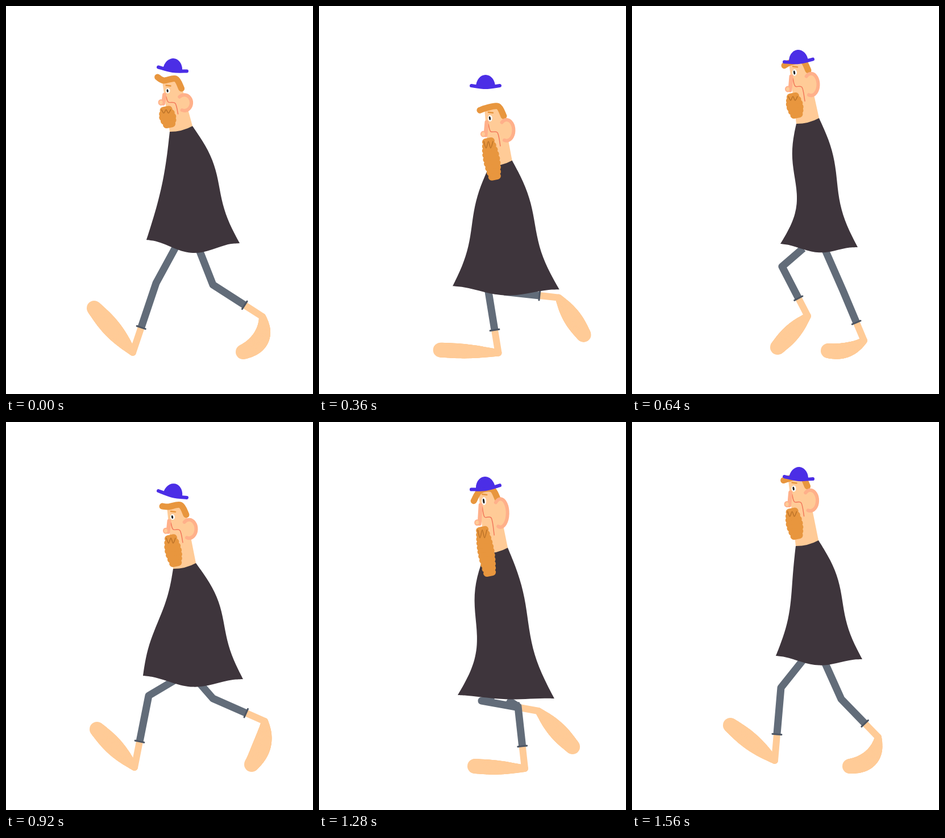
These frames come from a looping animation (540x682 px, 1.6 s). An HTML page with a canvas:

```html
<!DOCTYPE html>
<html lang="en">
<head>
<meta charset="utf-8">
<title>Walk</title>
<style>
  html, body { margin: 0; width: 100%; height: 100%; overflow: hidden; background: #fff; }
  canvas { display: block; }
</style>
</head>
<body>
<canvas id="stage" width="540" height="682"></canvas>
<script>
const ctx = document.getElementById('stage').getContext('2d');
const SKIN = '#ffcb97', PINK = '#ffb08a', LINE = '#f2775a', HAIR = '#e8963e', LIP = '#bd7429';
const DRESS = '#3e353c', PANTS = '#626c79', CUFF = '#4d5664', HAT = '#4b2ee6';
const { PI, sin, cos, min, max, abs, hypot, floor } = Math;

// One step lasts 800 ms; the key poses repeat at these times of every step.
const STEP = 800, FRAME = 40, BEATS = [0, 120, 200, 480, 640, 760];

// knee, heel, toe: one step on the ground, one in the air
const LEG = [
  [264,487, 223,609, 155,531],
  [251,481, 226,607, 160,540],
  [236,491, 251,610, 161,604],
  [350,500, 362,609, 274,605],
  [371,500, 408,588, 345,606],
  [368,487, 433,554, 383,605],
  [364,490, 451,546, 417,608],
  [364,486, 455,526, 432,602],
  [374,511, 451,523, 476,595],
  [286,490, 386,508, 446,571],
  [264,458, 309,545, 256,600],
  [262,467, 251,595, 173,533],
];
// neck x and y, heights of eye, hat, beard tip and hem, half width of the hem
const BODY = [
  [308,216, 149, 113, 214, 414, 82],
  [314,253, 167, 129, 254, 449, 88],
  [323,303, 228, 153, 297, 473, 95],
  [312,226, 139, 117, 271, 483, 85],
  [309,202, 117,  98, 197, 421, 68],
  [308,213, 117, 100, 206, 414, 76],
];

// Cubic interpolation of a looping track; tight tracks never pass their extremes.
function pose(track, t, tight) {
  const n = BEATS.length;
  const now = floor(t / STEP) * n + BEATS.filter(b => b <= t % STEP).length - 1;
  const key = j => track[(j + track.length) % track.length];
  const when = j => BEATS[(j + n) % n] + STEP * floor(j / n);
  const gap = j => when(j + 1) - when(j);
  const slope = (j, c) => (key(j + 1)[c] - key(j)[c]) / gap(j);
  const speed = (j, c) => {
    const a = slope(j - 1, c), b = slope(j, c);
    if (tight) return a * b > 0 ? 2 * a * b / (a + b) : 0;
    return (a * gap(j) + b * gap(j - 1)) / (gap(j - 1) + gap(j));
  };
  const h = gap(now), u = (t - when(now)) / h, v = 1 - u;
  return key(now).map((p, c) =>
    p * v * v * (1 + 2 * u) + key(now + 1)[c] * u * u * (3 - 2 * u) +
    h * u * v * (speed(now, c) * v - speed(now + 1, c) * u));
}

const mix = (p, q, u) => [p[0] + (q[0] - p[0]) * u, p[1] + (q[1] - p[1]) * u];
const steps = n => Array.from({ length: n + 1 }, (_, i) => i / n);

// Adds a smooth curve through the points to the current path.
function trace(points) {
  ctx.lineTo(...points[0]);
  for (let i = 0; i < points.length - 1; i++) {
    const p = points[i], q = points[i + 1];
    const before = points[i - 1] || p, after = points[i + 2] || q;
    ctx.bezierCurveTo(
      p[0] + (q[0] - before[0]) / 6, p[1] + (q[1] - before[1]) / 6,
      q[0] - (after[0] - p[0]) / 6, q[1] - (after[1] - p[1]) / 6, ...q);
  }
}

function stroke(points, color, width, cap = 'round', smooth = true) {
  ctx.beginPath();
  if (smooth) trace(points);
  else points.forEach(p => ctx.lineTo(...p));
  ctx.strokeStyle = color;
  ctx.lineWidth = width;
  ctx.lineCap = cap;
  ctx.stroke();
}

function fill(points, color) {
  ctx.beginPath();
  points.forEach(p => ctx.lineTo(...p));
  ctx.fillStyle = color;
  ctx.fill();
}

function oval(x, y, rx, ry, color, turn = 0, from = 0, to = 2 * PI) {
  ctx.beginPath();
  ctx.ellipse(x, y, rx, ry, turn, from, to);
  ctx.fillStyle = color;
  ctx.fill();
}

function outline(color, width) {
  ctx.strokeStyle = color;
  ctx.lineWidth = width;
  ctx.stroke();
}

// Everything on the body follows from one row of numbers and the phase of the step.
function bodyAt(t) {
  const [neckX, neckY, eyeY, hatY, beardY, hemY, hemHalf] = pose(BODY, t);
  const stretch = (hemY - eyeY - 245) / 100;
  const swing = degrees => cos(2 * PI * t / STEP - degrees * PI / 180);
  const eyeX = 286 + 1.4 * (neckX - 309);
  return { neckX, neckY, eyeX, eyeY, hatY, beardY, hemY, hemHalf, stretch, swing,
    noseY: 18 + 22 * stretch, face: (x, y) => [eyeX + x, eyeY + y] };
}

function drawLeg(t, hemY) {
  const [kx, ky, hx, hy, tx, ty] = pose(LEG, t, true);
  const knee = [kx, ky], heel = [hx, hy], toe = [tx, ty];
  const hip = [321 + .35 * (kx - 321), hemY + 5], cuff = mix(knee, heel, .64);

  // The foot bends while it pushes off and gets plumper when it leaves the floor.
  const bend = 32 * Math.exp(-(((t - 780) / 160) ** 2)) / hypot(tx - hx, ty - hy);
  const [mx, my] = mix(heel, toe, .5);
  const ball = [mx + (ty - hy) * bend, my + (hx - tx) * bend];
  const plump = 4 * min(1, abs(ty - hy) / 75);
  for (const u of steps(64)) {
    const r = 6 + 7 * sin(min(1.25 * u, 1) * PI / 2) + plump * sin(PI * u);
    oval(...mix(mix(heel, ball, u), mix(ball, toe, u), u), r, r, SKIN);
  }
  stroke([cuff, heel], SKIN, 12);
  stroke([hip, knee, cuff], PANTS, 13, 'butt', false);
  const k = 8 / hypot(hx - kx, hy - ky), nx = (ky - hy) * k, ny = (hx - kx) * k;
  stroke([[cuff[0] - nx, cuff[1] - ny], [cuff[0] + nx, cuff[1] + ny]], CUFF, 3);
}

function drawBody({ neckX, neckY, hemY, hemHalf, stretch, swing, face }) {
  const neck = side => [neckX + 20 * side, neckY - 5 * side];
  const hem = side => [329 + hemHalf * side, hemY + 3 * side];
  const edge = (side, bow, wave) => steps(12).map(u => {
    const [x, y] = mix(neck(side), hem(side), u);
    return [x + bow * sin(PI * u) + wave * sin(2 * PI * u), y];
  });
  const sag = steps(10).map(u => {
    const [x, y] = mix(hem(-1), hem(1), u);
    return [x, y + (24 - 20 * stretch) * sin(PI * u) ** 2];
  });
  const [a, b] = [neck(-1), neck(1)];

  fill([face(-10, -18), face(21, -20), b, [b[0], b[1] + 6], [a[0], a[1] + 6], a], SKIN);
  ctx.beginPath();
  trace(edge(-1, 5 - 8 * swing(100), -4 + 8 * swing(60)));
  trace(sag);
  trace(edge(1, 1 + 6 * swing(50), 7).reverse());
  ctx.quadraticCurveTo(neckX + 2, neckY + 5, ...a);
  ctx.fillStyle = DRESS;
  ctx.fill();
}

function drawFace({ stretch, noseY, face }) {
  stroke([face(-18, 30 * stretch - 30), face(-7, -18), face(14, -21), face(24, -4)], HAIR, 11);
  oval(...face(29, 21), 12.5, 11 + 14 * stretch, SKIN, 0, -2.3, 1.9);
  outline(PINK, 6);
  const fold = 10 * stretch;
  stroke([face(-3, 10), face(1, 18 + fold), face(13, 20 + fold), face(18, 36 + 2.4 * fold)], LINE, 1.5);

  const open = 4 + 3 * stretch;
  oval(...face(0, 0), 4, open, '#fff');
  oval(...face(-.5, 0), 1.6, open * .6, '#222', -.15);
  stroke([face(-3, -5 - open), face(5, -4 - open)], HAIR, 2.5);

  stroke([face(-6, 7), face(-8, noseY)], PINK, 7);
  oval(...face(-12, noseY - 2), 4, 4.5, SKIN);
  outline(PINK, 2);
}

function drawBeard({ beardY, eyeY, noseY, face }) {
  const length = max(30, beardY - eyeY - noseY - 6), rows = Math.round(length / 9);
  const root = face(-3, noseY + 11), tip = face(-3 + .15 * length, noseY + length);
  for (const u of steps(rows)) {
    const [x, y] = mix(root, tip, u), half = 5 + 4 * sin(PI * u);
    stroke([[x - half, y + 1], [x + half, y - 1]], HAIR, 12);
  }
  const lip = steps(4).map((u, i) => [root[0] - 8 + 16 * u, root[1] + i % 2 * .16 * length]);
  stroke(lip, LIP, 1.6);
}

function drawHat({ hatY, swing }) {
  const x = 293, tilt = 1 + 5 * swing(60);
  oval(x, hatY, 17, 21, HAT, tilt / 25, PI, 2 * PI);
  stroke([[x - 25, hatY - 2 - tilt], [x, hatY + 1], [x + 25, hatY - 2 + tilt]], HAT, 6);
}

function draw() {
  const t = floor(performance.now() / FRAME) * FRAME % STEP;
  const body = bodyAt(t);
  ctx.fillStyle = '#fff';
  ctx.fillRect(0, 0, 540, 682);
  ctx.lineJoin = 'round';
  drawLeg(t + STEP, body.hemY);
  drawLeg(t, body.hemY);
  drawBody(body);
  drawFace(body);
  drawBeard(body);
  drawHat(body);
  requestAnimationFrame(draw);
}
draw();
</script>
</body>
</html>
```
